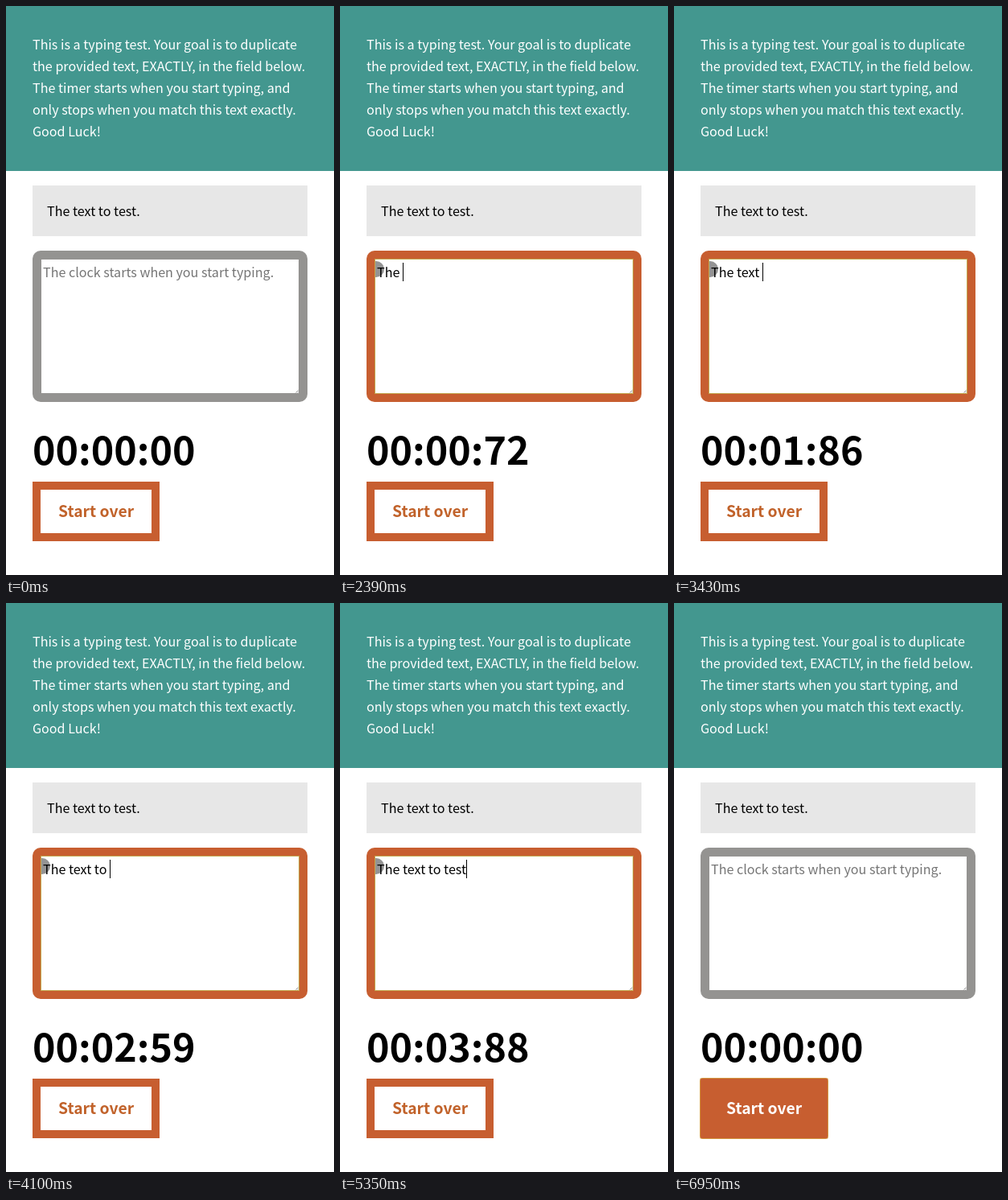
An HTML page that plays this animation: 408x707 px, repeating every 9360 ms.

```html
<!DOCTYPE html>
<html lang="en">
<head>
<meta charset="utf-8">
<title>Typing test</title>
<style>
  html, body { margin: 0; width: 100%; height: 100%; overflow: hidden; background: #fff; }
  svg { display: block; }
  text {
    font: 16.12px "Noto Sans CJK JP", "Noto Sans CJK SC", "Noto Sans CJK", "Open Sans", sans-serif;
    white-space: pre;
  }
  #intro text { fill: #fff; }
  #hint { fill: #757575; }
  #clock { font-size: 48.36px; font-weight: 700; }
  #label { font-size: 19.34px; font-weight: 700; }
</style>
</head>
<body>
<svg width="408" height="707" viewBox="0 0 408 707">
  <rect width="408" height="205" fill="#43978f"/>
  <g id="intro"></g>
  <rect x="33" y="223" width="342" height="63" fill="#e7e7e7"/>
  <text x="51" y="261">The text to test.</text>

  <rect id="frame" x="33" y="304" width="342" height="188" rx="10"/>
  <rect x="44" y="315" width="320" height="166" fill="#fff"/>
  <circle id="tap" cx="45" cy="327" r="10" fill="#949494" clip-path="inset(0 0 0 8px)"/>
  <rect id="ring" x="43.5" y="314.5" width="321" height="167" fill="none"/>
  <path d="M360.5 480.5l3-3M362.5 480.5l1-1" stroke="#777" stroke-width=".8"/>
  <text id="hint" x="46" y="337">The clock starts when you start typing.</text>
  <text id="typed" x="46" y="337"></text>
  <rect id="caret" y="319" width="1" height="23"/>

  <text id="clock" x="33" y="570">00:00:00</text>
  <rect id="button" x="38" y="596" width="148" height="64" stroke="#c75e30" stroke-width="10"/>
  <rect id="halo" x="32.5" y="590.5" width="159" height="75" rx="2" fill="none" stroke="#d3953f"/>
  <text id="label" x="65" y="635">Start over</text>
  <circle id="pointer" r="10" fill="#949494"/>
</svg>
<script>
const LOOP = 9360, FOCUS = 790, START = 1710, DONE = 5400, LEAVE = 5730, CLICK = 6350, END = 6950;
const PHRASE = 'The text to test.';
const KEYS = [1710, 1940, 2130, 2350, 2590, 2760, 2960, 3160, 3400,
              3570, 3760, 4060, 4300, 4500, 4700, 4880, 5400];
// time, hundredths, refreshes until the next row
const TICKS = [[1710, 0, 15], [2390, 72, 24], [3430, 186, 16], [4100, 259, 20], [4910, 347, 12], [5400, 396, 1]];
// time, x, y
const PATH = [[5730, 45, 327], [5970, 172, 607], [6200, 140, 627], [6790, 140, 627], [6950, 45, 512]];

const $ = id => document.getElementById(id);
const show = (id, on) => $(id).setAttribute('visibility', on ? 'visible' : 'hidden');
const paint = (id, attrs) => { for (const k in attrs) $(id).setAttribute(k, attrs[k]); };
const pad = n => String(n).padStart(2, '0');
const mix = (a, b, p) => a + (b - a) * p;

['This is a typing test. Your goal is to duplicate',
 'the provided text, EXACTLY, in the field below.',
 'The timer starts when you start typing, and',
 'only stops when you match this text exactly.',
 'Good Luck!'].forEach((line, i) => {
  const row = document.createElementNS('http://www.w3.org/2000/svg', 'text');
  row.setAttribute('x', 33);
  row.setAttribute('y', 54 + 27 * i);
  row.textContent = line;
  $('intro').append(row);
});

function hundredths(t) {
  if (t < START || t >= CLICK) return 0;
  const i = TICKS.findLastIndex(row => t >= row[0]);
  const a = TICKS[i], b = TICKS[i + 1];
  if (!b) return a[1];
  const step = Math.floor((t - a[0]) / (b[0] - a[0]) * a[2] + 1e-6);
  return Math.round(mix(a[1], b[1], step / a[2]));
}

function pointerAt(t) {
  const i = Math.max(0, Math.min(PATH.length - 2, PATH.findLastIndex(row => t >= row[0])));
  const a = PATH[i], b = PATH[i + 1];
  const p = Math.min(1, Math.max(0, (t - a[0]) / (b[0] - a[0])));
  return { cx: mix(a[1], b[1], p), cy: mix(a[2], b[2], p) };
}

function draw(t) {
  const reset = t >= CLICK;
  const active = t >= START && !reset;
  const solved = t >= DONE;
  const count = active ? KEYS.filter(k => t >= k).length : 0;

  $('typed').textContent = PHRASE.slice(0, count);
  show('hint', !active);
  paint('frame', { fill: !active ? '#949391' : solved ? '#43af4a' : '#c75e30' });
  show('ring', t >= FOCUS && !reset);
  paint('ring', { stroke: solved ? '#cf9f56' : '#c3a84f' });
  show('tap', t >= FOCUS && t < LEAVE);

  paint('caret', { x: Math.round(46 + (count ? $('typed').getComputedTextLength() : 0)) });
  show('caret', (t >= FOCUS && t < 1260) || (t >= START && t < 5880));

  const c = hundredths(t);
  $('clock').textContent = `00:${pad(Math.floor(c / 100))}:${pad(c % 100)}`;

  paint('button', { fill: reset ? '#c75e30' : '#fff' });
  paint('label', { fill: reset ? '#fff' : '#c1622a' });
  show('halo', reset);
  show('pointer', t >= LEAVE && t < END);
  paint('pointer', pointerAt(t));
}

const origin = performance.now();
function tick() {
  draw((performance.now() - origin) % LOOP);
  requestAnimationFrame(tick);
}
tick();
</script>
</body>
</html>
```
